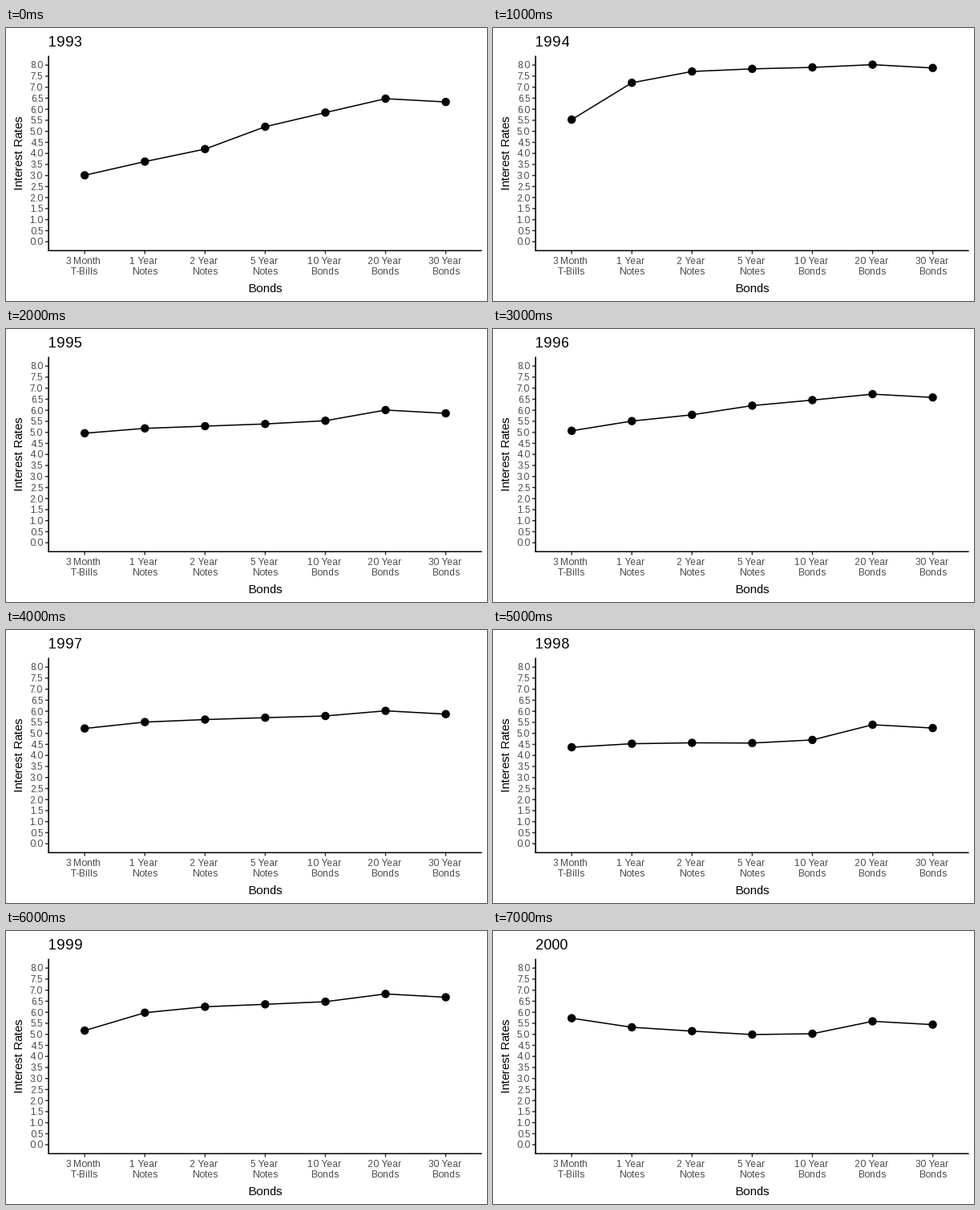
These frames come from a looping animation (600x340 px, 8 s). A matplotlib script:

```python
import matplotlib.pyplot as plt
from matplotlib.animation import FuncAnimation
from matplotlib.patches import Circle

W, H, DPI = 600, 340, 100
PT = 72 / DPI  # points per pixel
LEFT, RIGHT, TOP, BOTTOM = 53.1, 593.6, 34.6, 277.3
STEP = (RIGHT - LEFT) / 7.2
Y0, UNIT = 266.2, 27.5
GREY, DARK = "#4d4d4d", "#333333"
FIRST_YEAR = 1993

TERMS = ["3 Month", "1 Year", "2 Year", "5 Year", "10 Year", "20 Year", "30 Year"]
KINDS = ["T-Bills"] + ["Notes"] * 3 + ["Bonds"] * 3

# Key rates per year: 3 months, 1 year, 5 years, 20 years
KEYS = [(3.01, 3.63, 5.21, 6.48), (5.53, 7.20, 7.83, 8.02),
        (4.96, 5.18, 5.38, 6.01), (5.07, 5.51, 6.21, 6.73),
        (5.22, 5.51, 5.71, 6.02), (4.37, 4.53, 4.56, 5.39),
        (5.17, 5.98, 6.36, 6.83), (5.73, 5.32, 4.99, 5.59)]

plt.rcParams.update({"font.family": "Liberation Sans",
                     "text.hinting": "force_autohint",
                     "text.hinting_factor": 1})
fig = plt.figure(figsize=(W / DPI, H / DPI), dpi=DPI, facecolor="white")
ax = fig.add_axes([0, 0, 1, 1])
ax.set(xlim=(0, W), ylim=(H, 0))
ax.axis("off")


def stroke(xs, ys, color="black", width=1.45):
    return ax.plot(xs, ys, color=color, lw=width * PT, snap=False,
                   solid_capstyle="butt")[0]


def label(x, y, text, size, color="black", ha="center", **kw):
    return ax.text(x, y, text, fontsize=size * PT, color=color, ha=ha,
                   va="baseline", **kw)


def y_of(rate):
    return Y0 - UNIT * rate


def yield_curve(bill, one, five, twenty):
    """Fill in the other maturities from the slopes between the key rates."""
    two = one + 0.2 * (one - bill) + 0.28 * (five - one)
    ten = five + 0.4 * (five - two) + 0.2 * (twenty - five) - 0.02
    return [bill, one, two, five, ten, twenty, twenty - 0.15]


xs = [LEFT + STEP * (i + 0.6) for i in range(len(TERMS))]

for i in range(17):
    y = y_of(i / 2)
    stroke([LEFT - 4.2, LEFT], [y, y], DARK)
    label(46, y + 4.3, f"{i / 2:.1f}", 11.73, GREY, "right")

for x, term, kind in zip(xs, TERMS, KINDS):
    stroke([x, x], [BOTTOM, BOTTOM + 4.2], DARK)
    label(x - 1.4, 294.3, term, 11.73, GREY)
    label(x - 0.4, 307.3, kind, 11.73, GREY)

stroke([LEFT, LEFT], [TOP, BOTTOM + 0.7], width=1.6)
stroke([LEFT - 0.7, RIGHT], [BOTTOM, BOTTOM], width=1.5)
label((LEFT + RIGHT) / 2 - 0.5, 329, "Bonds", 14.67)
label(21, (TOP + BOTTOM) / 2 - 0.5, "Interest Rates", 14.67, rotation=90,
      rotation_mode="anchor")

title = label(53, 23, "", 17.6, ha="left")
curve = stroke(xs, [Y0] * len(xs), width=1.55)
dots = [ax.add_patch(Circle((x, Y0), 5.2, color="black", lw=0)) for x in xs]


def draw(i):
    ys = [y_of(rate) for rate in yield_curve(*KEYS[i])]
    title.set_text(str(FIRST_YEAR + i))
    curve.set_ydata(ys)
    for dot, x, y in zip(dots, xs, ys):
        dot.center = x, y
    return title, curve, *dots


anim = FuncAnimation(fig, draw, frames=len(KEYS), interval=1000, repeat=True,
                     repeat_delay=0)
plt.show()
```
